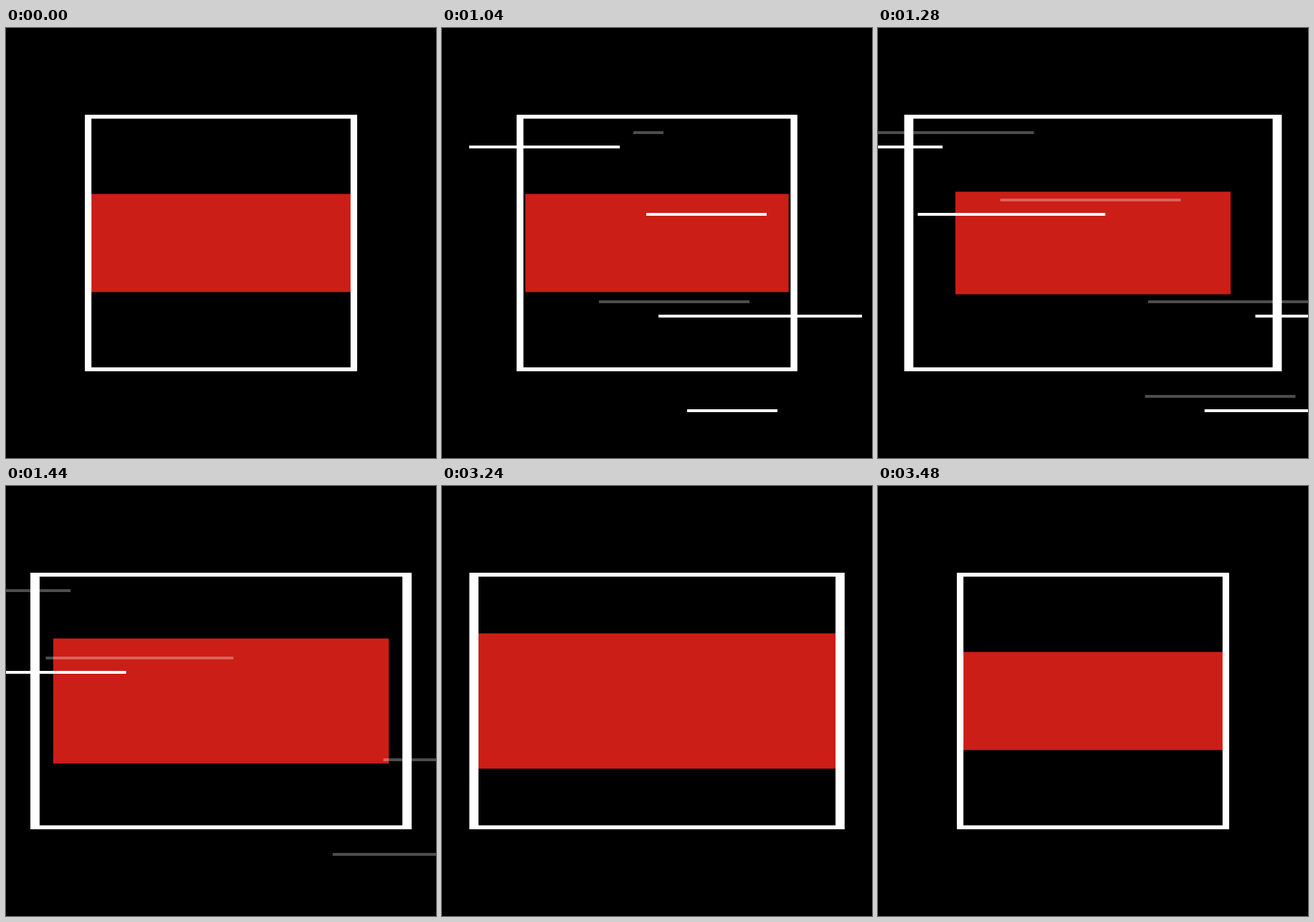
An HTML page that plays this animation: 600 by 600 pixels, repeating every 3880 ms.

```html
<!DOCTYPE html>
<html lang="en">
<head>
<meta charset="utf-8">
<title>Stretching frame</title>
<style>
  html, body { margin: 0; width: 100%; height: 100%; overflow: hidden; background: #000; }
  svg { display: block; width: 100%; height: 100%; }
</style>
</head>
<body>
<svg id="stage" viewBox="0 0 600 600">
  <rect width="600" height="600" fill="#000"/>
  <rect id="band" x="-183.7" y="-68.5" width="367.4" height="137" fill="#cb1e16"/>
  <path id="frame" fill="#fff" fill-rule="evenodd"
        d="M-190-179H190V179H-190ZM-180.8-173.5V173.5H180.8V-173.5Z"/>
  <g id="streaks" fill="#fff"></g>
</svg>
<script>
const LOOP = 3880, STEP = 40, GROW = 0.4;
const LENGTH = 306;   // full streak length
const LIFE = 17;      // steps a streak lives
const DRIFT = 15.25, DRAW = 42, ERASE = 22.15;  // px per step

const byId = id => document.getElementById(id);
const band = byId('band'), frame = byId('frame'), group = byId('streaks');

// Each streak has a faint echo, higher up and a little later.
const streaks = [
  { y: 400, x: 142.75, dir: 1, start: 680 },
  { y: 164, x: 324.25, dir: -1, start: 840 },
  { y: 258, x: 514, dir: -1, start: 880 },
  { y: 532, x: 296.3, dir: 1, start: 920 }
].flatMap(s => [
  { ...s, alpha: 1 },
  { ...s, y: s.y - 20, start: s.start + 160, alpha: 0.3 }
]);

for (const s of streaks) {
  s.el = document.createElementNS('http://www.w3.org/2000/svg', 'rect');
  s.el.setAttribute('y', s.y);
  s.el.setAttribute('height', 4);
  s.el.setAttribute('fill-opacity', s.alpha);
  group.append(s.el);
}

function ease(t, start, duration) {
  const k = Math.min(1, Math.max(0, (t - start) / duration));
  return k * k * (3 - 2 * k);
}

function drawStreak(s, t) {
  const n = (t - s.start) / STEP;
  const drawn = Math.min(LENGTH, DRAW * n);
  const erased = Math.max(0, ERASE * (n - 8));
  const width = n > 0 && n < LIFE ? Math.max(0, drawn - erased) : 0;
  const tail = s.x + s.dir * (DRIFT * n + erased);
  s.el.setAttribute('x', s.dir > 0 ? tail : tail - width);
  s.el.setAttribute('width', width);
}

function render(t) {
  const back = ease(t, 3200, 280);
  const wide = 1 + GROW * (ease(t, 983, 334) - back);
  const big = 1 + GROW * (ease(t, 1200, 383) - back);
  frame.setAttribute('transform', `translate(300 300) scale(${wide} 1)`);
  band.setAttribute('transform', `translate(300 300) scale(${big})`);
  streaks.forEach(s => drawStreak(s, t));
}

const origin = performance.now();
function tick() {
  const t = (performance.now() - origin) % LOOP;
  render(Math.floor(t / STEP) * STEP);
  requestAnimationFrame(tick);
}
tick();
</script>
</body>
</html>
```
